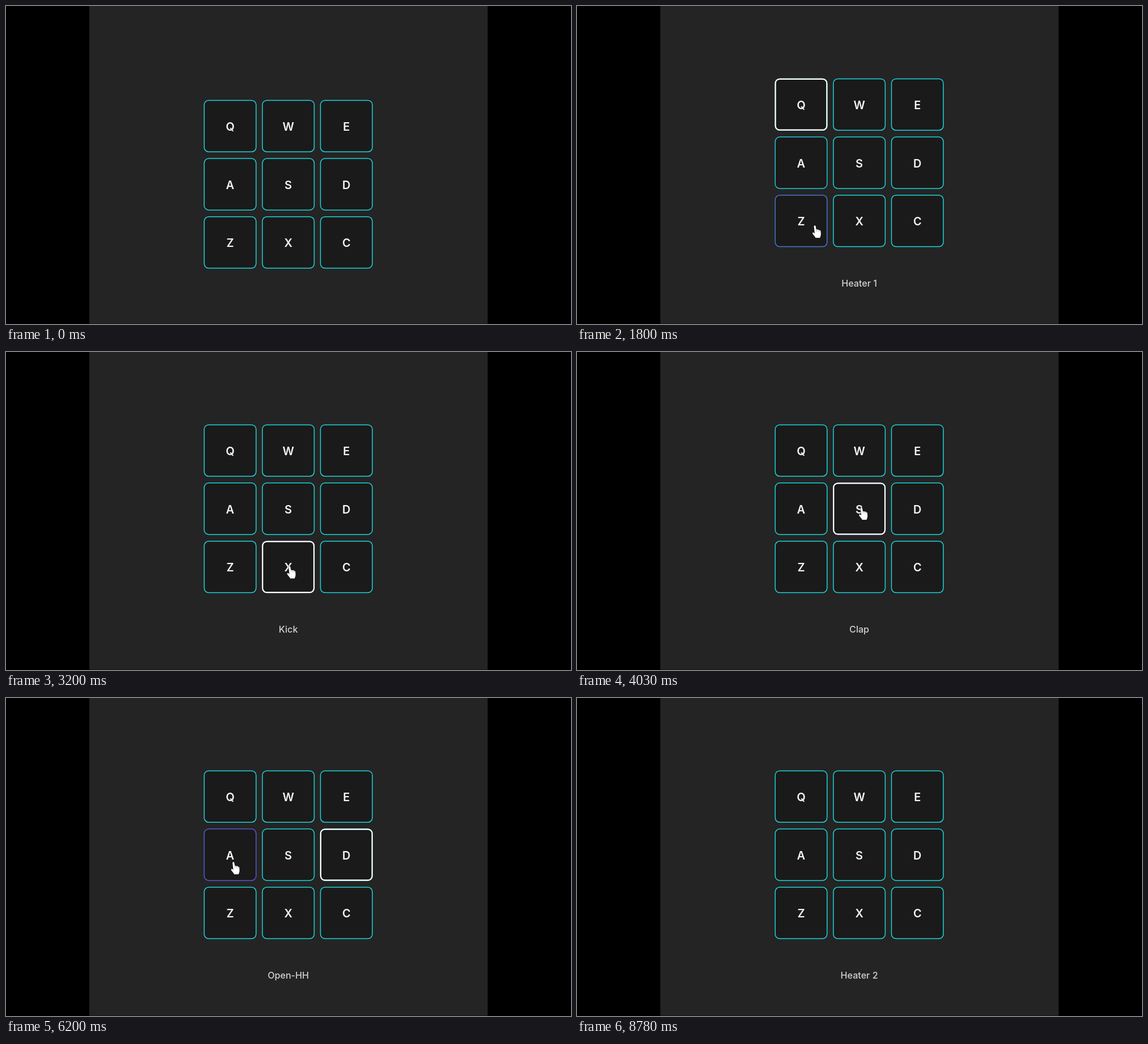
These frames come from a looping animation (998 by 561 pixels, 8850 ms). An HTML page:

```html
<!DOCTYPE html>
<html lang="en">
<head>
<meta charset="utf-8">
<title>Drum pad</title>
<style>
  html, body { margin: 0; width: 100%; height: 100%; overflow: hidden; background: #000; }
  svg { display: block; width: 998px; height: 561px; }
  text { font-family: Inter, sans-serif; text-anchor: middle; }
  .key { fill: #1a1a1a; stroke-width: 1.5; }
  .letter { font-size: 20px; font-weight: 600; fill: #f4f4f4; }
  #label { font-size: 16.1px; font-weight: 500; fill: #d2d2d2; }
  #ring { fill: none; stroke: #fff; stroke-width: 2.2; }
</style>
</head>
<body>
<svg viewBox="0 0 998 561">
  <rect x="147.2" width="703.5" height="560.6" fill="#242424"/>
  <g id="pad">
    <g id="keys"></g>
    <rect id="ring" width="90.8" height="89.8" rx="7.5"/>
    <g id="letters"></g>
  </g>
  <text id="label" x="498.6" y="494.7"></text>
  <g id="hand">
    <g transform="scale(.93 1)">
      <path fill="#fff" stroke="#151515" stroke-width="1" paint-order="stroke" stroke-linejoin="round"
        d="M-1.9 1.2C-1.7-.8 1-.9 1.4 1L2.6 7C3.6 6 5.4 6.3 5.9 7.4C7 6.7 8.5 7.2 8.8 8.3C10 8 11 8.8 11.1 10L11.4 15C11.4 18 10 19.5 9.6 21.5H1.2C.4 19-2.5 17-4.3 14.2C-5.3 12.6-3.6 11.2-2 12.4L-.4 13.6Z"/>
      <path fill="none" stroke="#777" stroke-width=".6" d="M2.7 7.2l.5 3M5.9 7.6l.4 2.8M8.8 8.5l.2 2.6"/>
    </g>
  </g>
</svg>
<script>
const LOOP = 8850, APPEAR = 70, WAKE = 610, LEAVE = 8050;
const PITCH = 102.7, HALF = 46, SHIFT = 38;
const FADE = 200, SETTLE = 250, DWELL = 200;
const CYAN = [29, 212, 217], INDIGO = [86, 90, 212];
const NAMES = {
  Q: 'Heater 1', W: 'Heater 2', E: 'Heater 3',
  A: 'Heater 4', S: 'Clap', D: 'Open-HH',
  Z: "Kick-n'-Hat", X: 'Kick', C: 'Closed-HH'
};
// key, time of the click, fingertip offset from the key's centre
const CLICKS = [
  ['Q', 1200, 16, 27], ['Z', 2130, 25, 20], ['X', 2850, 2, 19], ['S', 3890, 4, -2],
  ['C', 4800, 4, 10], ['D', 5570, 4, 5], ['A', 6340, 6, 13], ['W', 7250, 16, 26]
];

const $ = id => document.getElementById(id);
const clamp = v => Math.min(1, Math.max(0, v));
const smooth = v => v * v * (3 - 2 * v);
const mix = (a, b, k) => a + (b - a) * k;
const pressedAt = t => (CLICKS.filter(c => c[1] <= t).pop() || [''])[0];
const shiftAt = t => pressedAt(t) ? 0 : SHIFT;

function add(parent, tag, attrs) {
  const el = document.createElementNS('http://www.w3.org/2000/svg', tag);
  for (const name in attrs) el.setAttribute(name, attrs[name]);
  return parent.appendChild(el);
}

const keys = {};
Object.keys(NAMES).forEach((name, i) => {
  const x = 395.9 + PITCH * (i % 3), y = 173.8 + PITCH * Math.floor(i / 3);
  const rect = add($('keys'), 'rect',
    { class: 'key', x: x - 45.8, y: y - 45.4, width: 91.6, height: 90.8, rx: 8 });
  add($('letters'), 'text', { class: 'letter', x, y: y + 8 }).textContent = name;
  keys[name] = { x, y, rect };
});

// The pointer drifts in, then rests on each key around its click.
const moves = [{ from: APPEAR, to: APPEAR + 140, x: 462, y: 319 }];
CLICKS.forEach(([name, time, dx, dy], i) => moves.push({
  from: i ? CLICKS[i - 1][1] + DWELL : WAKE,
  to: time - SETTLE,
  x: keys[name].x + dx,
  y: keys[name].y + dy + (i ? 0 : SHIFT)
}));

function tipAt(t) {
  let x = 489, y = 351;
  for (const m of moves) {
    const k = smooth(clamp((t - m.from) / (m.to - m.from)));
    x = mix(x, m.x, k);
    y = mix(y, m.y, k);
  }
  return [x, y];
}

function keyUnder(t) {
  if (t < WAKE) return;
  const [x, y] = tipAt(t), dy = shiftAt(t);
  return Object.keys(keys).find(name =>
    Math.abs(x - keys[name].x) < HALF && Math.abs(y - keys[name].y - dy) < HALF);
}

// Share of the last FADE ms that the pointer spent over each key.
function glowAt(t) {
  const glow = {}, steps = 20;
  if (t >= LEAVE) return glow;
  for (let i = 0; i < steps; i++) {
    const name = keyUnder(t - FADE * i / steps);
    if (name) glow[name] = (glow[name] || 0) + 1 / steps;
  }
  return glow;
}

function draw(t) {
  const pressed = pressedAt(t), focused = pressed && t < LEAVE;
  $('pad').setAttribute('transform', `translate(0 ${shiftAt(t)})`);
  $('label').textContent = NAMES[pressed] || '';

  $('ring').style.display = focused ? '' : 'none';
  if (focused) {
    $('ring').setAttribute('x', keys[pressed].x - 45.4);
    $('ring').setAttribute('y', keys[pressed].y - 44.9);
  }

  const glow = glowAt(t);
  for (const name in keys) {
    const k = smooth(glow[name] || 0);
    keys[name].rect.style.stroke = `rgb(${CYAN.map((c, i) => Math.round(mix(c, INDIGO[i], k)))})`;
  }

  $('hand').style.display = t >= APPEAR && t < LEAVE ? '' : 'none';
  $('hand').setAttribute('transform', `translate(${tipAt(t)})`);
}

const start = performance.now();
function tick() {
  draw((performance.now() - start) % LOOP);
  requestAnimationFrame(tick);
}
tick();
</script>
</body>
</html>
```
